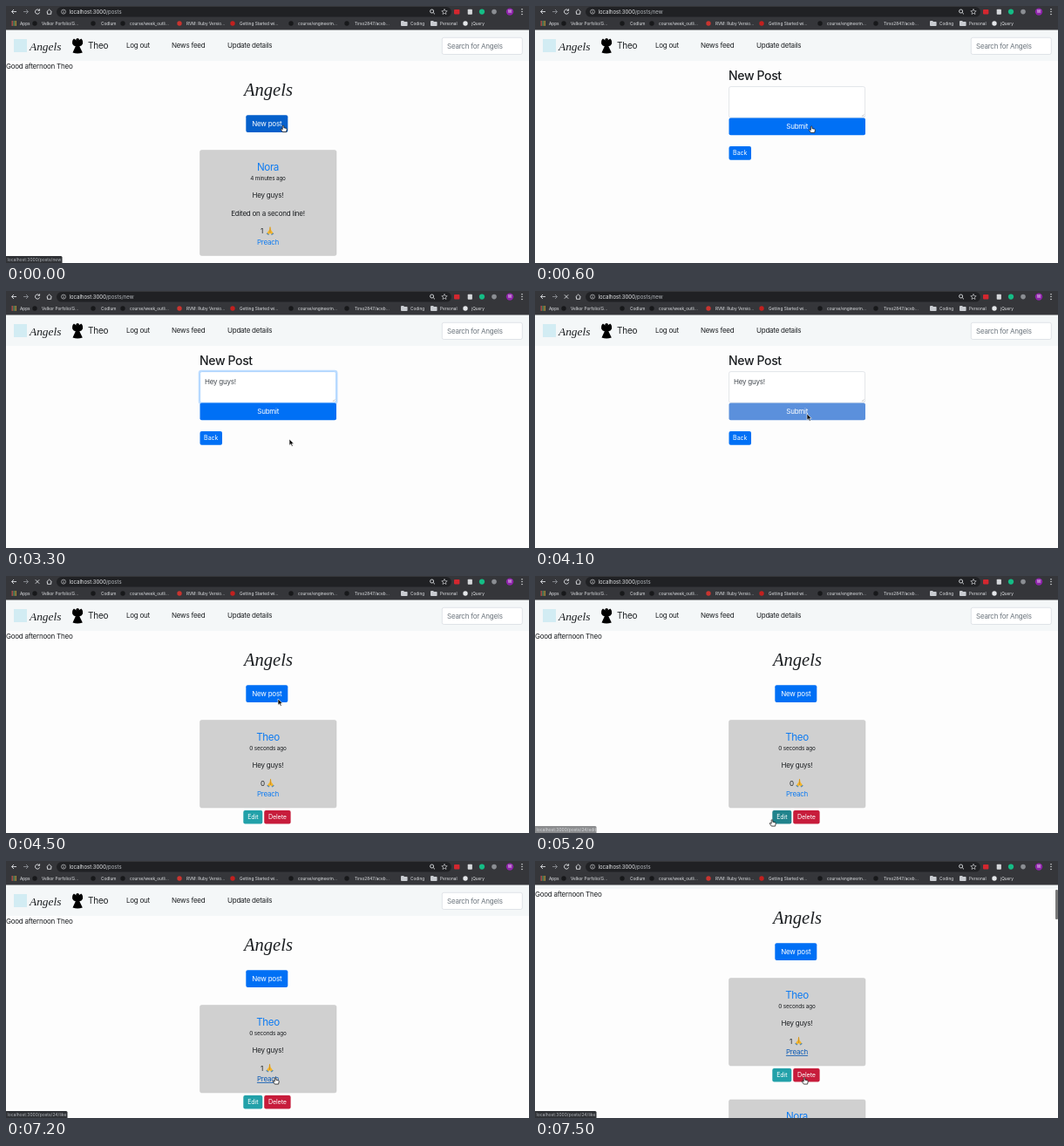
Write an HTML page that moves like this. It is 600x295 px and loops after 7600 ms.

```html
<!DOCTYPE html>
<html lang="en">
<head>
<meta charset="utf-8">
<title>Angels</title>
<style>
  html, body { margin: 0; width: 100%; height: 100%; overflow: hidden; background: #fdfdfd; }
  svg { display: block; }
  text { font: 8px Inter, "Open Sans", sans-serif; letter-spacing: -.23px; fill: #1b1e21; white-space: pre; }
  .mid { text-anchor: middle; }
  .link { fill: #0d7bf2; }
  .name { font-size: 11.6px; letter-spacing: -.4px; }
  .ago { font-size: 6.4px; letter-spacing: -.18px; }
  .small { font-size: 7.1px; letter-spacing: -.08px; }
  .head { font-size: 14px; font-weight: 500; letter-spacing: -.35px; }
  .url { font-size: 6px; letter-spacing: 0; fill: #e8eaed; }
  .fav { font-size: 4.75px; letter-spacing: 0; fill: #e3e5e8; }
  .tip { font-size: 5px; letter-spacing: 0; fill: #b4b8bd; }
  .light { fill: #fff; }
  .script { font-family: "Liberation Serif", serif; font-style: italic; letter-spacing: 0; }
  .path { fill: #b6babf; }
  .stroke { fill: none; stroke: #dfe1e5; stroke-width: .9; }
</style>
</head>
<body>
<svg id="stage" width="600" height="295" viewBox="0 0 600 295">
  <defs>
    <g id="pray">
      <path d="M1.2 7.6 4 3.6 4.6.2Q5-.5 5.4.2L6 3.6 8.8 7.6 6.7 9 5 7.2 3.3 9Z" fill="#f3b52c"/>
      <path d="M5 .4V7" stroke="#bd7c1d" stroke-width=".6"/>
      <path d="M.6 7.9 1.8 7 3.9 8.8 3 9.6ZM9.4 7.9 8.2 7 6.1 8.8 7 9.6Z" fill="#4f88b8"/>
    </g>
    <g id="folder"><path d="M0 1Q0 0 1 0H3L4 1H7Q7.6 1 7.6 2V5Q7.6 6 7 6H1Q0 6 0 5Z" fill="#c9ccd1"/></g>
  </defs>
  <g id="view"></g>
  <g id="chrome"></g>
  <g id="status">
    <rect id="bubble" x="-2" y="287" height="10" rx="1.5" fill="#303236"/>
    <text id="tip" class="tip" x="1.5" y="293"></text>
  </g>
  <rect id="thumb" x="597" y="33" width="3" height="34" rx="1" fill="#777"/>
  <g id="pointer">
    <path id="arrow" d="M0 0V7.2L1.7 5.7 2.9 8.3 4.2 7.7 3 5.2H5.3Z" fill="#111" stroke="#fff" stroke-width=".6"/>
    <path id="hand" d="M-.8.6Q0-.5.8.6V2.8L3.6 3.4Q4.4 3.7 4.2 4.7L3.6 7.6H-.7L-2.8 4.6Q-2.7 3.6-1.7 4.1L-.8 4.8Z" fill="#fff" stroke="#111" stroke-width=".75"/>
  </g>
</svg>
<script>
const LOOP = 7600, STEP = 100;
const USER = 'Theo', FRIEND = 'Nora';
const BLUE = '#0070f5', BLUE_HOVER = '#0560cb';
const MESSAGE = 'Hey guys!';
const $ = id => document.getElementById(id);

const text = (x, y, str, cls = '', extra = '') =>
  `<text x="${x}" y="${y}" class="${cls}" ${extra}>${str}</text>`;
const box = (x, y, w, h, fill, extra = '') =>
  `<rect x="${x}" y="${y}" width="${w}" height="${h}" fill="${fill}" ${extra}/>`;
const dot = (x, y, r, fill) => `<circle cx="${x}" cy="${y}" r="${r}" fill="${fill}"/>`;
const button = (id, x, y, w, h, fill, label, base, cls = '') =>
  box(x, y, w, h, fill, `id="${id}" rx="2"`) + text(x + w / 2, base, label, 'mid light ' + cls);

function card(y, name, ago, lines, count, id) {
  const end = y + 54.5 + 20.5 * lines.length;
  return box(222.5, y, 156.5, end - y + 25.5, '#d0d0d0', 'rx="2" stroke="#c6c6c6" stroke-width=".5"')
    + text(300.5, y + 23, name, 'mid link name')
    + text(300.5, y + 34.8, ago, 'mid ago')
    + lines.map((s, i) => text(300.5, y + 54.5 + 20.5 * i, s, 'mid')).join('')
    + text(292, end, count, '', `id="${id}Count"`)
    + `<use id="${id}Pray" href="#pray" x="298" y="${end - 7.6}"/>`
    + text(300.5, end + 12.5, 'Preach', 'mid link', `id="${id}Preach"`);
}

function navbar() {
  const angel = 'M82 40.5 78 37.5Q75.5 39 76.2 43.5 77.5 46 79.8 46.2L76.5 53.5Q82 55.5 87.8 53.5'
    + 'L84.3 46.2Q86.8 46 88 43.5 88.6 39 86.2 37.5Z';
  return box(0, 27, 600, 36, '#f4f7f8')
    + box(9, 38, 15, 15, '#d2ecf3')
    + text(27, 51, 'Angels', 'script', 'style="font-size:13.4px"')
    + `<path d="${angel}"/>` + dot(82.1, 39, 1.9, '#000')
    + text(94, 48.5, USER, '', 'style="font-size:10px"')
    + text(138, 48, 'Log out') + text(190, 48, 'News feed') + text(254, 48, 'Update details')
    + box(500.3, 36.3, 92, 19.2, '#fff', 'rx="2" stroke="#ced4da" stroke-width=".6"')
    + text(506, 48.8, 'Search for Angels', '', 'style="fill:#6c757d"');
}

function feed() {
  return text(0, 72, 'Good afternoon ' + USER)
    + text(301, 103, 'Angels', 'mid script', 'style="font-size:20.5px"')
    + button('newPost', 275.3, 125.3, 48, 19.6, BLUE, 'New post', 138)
    + `<g id="before">${card(165.5, FRIEND, '4 minutes ago', [MESSAGE, 'Edited on a second line!'], 1, 'old')}</g>`
    + `<g id="after">${card(165.5, USER, '0 seconds ago', [MESSAGE], 0, 'own')}`
    + button('edit', 272.3, 269, 22, 15.6, '#22a1a9', 'Edit', 279.4, 'small')
    + button('remove', 296.2, 269, 30.4, 15.6, '#c71c3b', 'Delete', 279.4, 'small')
    + card(305, FRIEND, '4 minutes ago', [MESSAGE, 'Edited on a second line!'], 1, 'next') + '</g>';
}

function form() {
  return text(222, 84.7, 'New Post', 'head')
    + box(221.6, 91.6, 158, 37.6, 'none', 'id="ring" rx="2.5" stroke="#bcdcff" stroke-width="1.8"')
    + box(222.6, 92.6, 156, 35.6, '#fff', 'id="area" rx="2" stroke-width=".6"')
    + '<path d="M375 126.8 377.4 124.4M376.6 126.8 377.4 126" stroke="#888" stroke-width=".5"/>'
    + text(228, 107, '', '', 'id="typed" style="fill:#454b51"')
    + box(228, 99.5, .7, 9.5, '#222', 'id="caret"')
    + button('submit', 222.5, 128.6, 156.5, 19.6, BLUE, 'Submit', 141.4)
    + button('back', 222.5, 161, 25.5, 15.8, BLUE, 'Back', 171.4, 'small');
}

function chrome() {
  const links = [
    [33, 41, 'Velkor Porfolio/G...', '#17181a'], [100, 109, 'Codlum', '#17181a'],
    [134, 142, 'course/week_outli...', '#17181a'], [199, 207, 'RVM: Ruby Versio...', '#c9342f'],
    [260, 268, 'Getting Started wi...', '#c2201f'], [327, 335, 'course/engineerin...', '#17181a'],
    [391, 400, 'Tirso2847/aceb...', '#17181a'], [527, 534, 'jQuery', '#e4e6e9']
  ];
  let s = box(0, 0, 600, 27.5, '#35363a') + box(58, 1, 453, 11.6, '#202124', 'rx="5.8"');
  s += '<path class="stroke" d="M12 6.5H6.5M9 4 6.5 6.5 9 9"/>'
    + '<path class="stroke" style="stroke:#8b8e93" d="M20 6.5H25.5M23 4 25.5 6.5 23 9"/>'
    + '<path id="reload" class="stroke" d="M38.2 5A2.6 2.6 0 1 0 38.6 7.3M38.6 3.3V5.3H36.6"/>'
    + '<path id="stop" class="stroke" d="M33.8 4.3 38.2 8.7M38.2 4.3 33.8 8.7"/>'
    + '<path class="stroke" d="M46.6 6.8 49.6 4 52.6 6.8M47.5 6.5V9.3H51.7V6.5"/>'
    + '<circle class="stroke" style="stroke-width:.6" cx="66" cy="6.6" r="2.5"/>'
    + '<path class="stroke" style="stroke-width:.7" d="M66 6.3V8M66 4.9V5.5"/>'
    + `<text x="72.5" y="8.8" class="url">localhost:3000<tspan id="path" class="path"></tspan></text>`;
  s += '<circle class="stroke" cx="488.6" cy="6" r="2"/><path class="stroke" d="M490.2 7.6 492 9.4"/>'
    + '<path class="stroke" style="stroke-width:.6" d="M503 3.4 503.9 5.6 506.2 5.8 504.4 7.2 505 9.5 503 8.2 501 9.5 501.6 7.2 499.8 5.8 502.1 5.6Z"/>'
    + box(514, 4, 6.4, 5.4, '#d3272f', 'rx=".8"') + box(529.7, 3.7, 5.2, 6, '#d5d7da', 'rx=".8"')
    + dot(546, 6.6, 3.1, '#15bd86') + dot(560, 6.6, 2.8, '#8b8e93')
    + dot(578, 6.6, 4.2, '#8e24aa') + text(578, 8.4, 'W', 'mid fav light')
    + [3.8, 6.6, 9.4].map(y => dot(592, y, .75, '#e4e6e9')).join('');
  for (let i = 0; i < 9; i++)
    s += box(6.5 + i % 3 * 2, 17.2 + (i / 3 | 0) * 2, 1.4, 1.4, ['#e25b50', '#58a86a', '#dfb13a'][i % 3]);
  s += text(16, 21.8, 'Apps', 'fav')
    + links.map(([cx, x, label, fill]) => dot(cx, 20, 2.7, fill) + text(x, 21.8, label, 'fav')).join('');
  return s + '<use href="#folder" x="453" y="17"/><use href="#folder" x="487" y="17"/>'
    + text(464, 21.8, 'Coding', 'fav') + text(498, 21.8, 'Personal', 'fav');
}

$('view').innerHTML = navbar() + `<g id="feed">${feed()}</g><g id="form">${form()}</g>`;
$('chrome').innerHTML = chrome();

// Pointer stops: time, x, y
const ROUTE = [
  [0, 318, 137], [800, 317, 138], [1100, 303, 112], [2300, 303, 124], [2400, 307, 131],
  [3200, 311, 147], [3300, 325, 170], [3500, 323, 166], [3800, 312, 141], [4800, 312, 141],
  [5000, 288, 225], [5200, 272, 279.5], [5300, 278, 274], [5500, 309, 248.5], [LOOP, 309, 248.5]
];

function pointerAt(t) {
  const i = ROUTE.findIndex(p => p[0] > t);
  const [a, b] = [ROUTE[i - 1], ROUTE[i]];
  const k = (t - a[0]) / (b[0] - a[0]), e = k * k * (3 - 2 * k);
  return [a[1] + (b[1] - a[1]) * e, a[2] + (b[2] - a[2]) * e];
}

const show = (id, on) => { $(id).style.display = on ? '' : 'none'; };
const fill = (id, color) => $(id).setAttribute('fill', color);
const within = (t, a, b) => t >= a && t < b;

function render(t) {
  const writing = within(t, 400, 4500), posted = t >= 4500;
  const loading = within(t, 200, 500) || within(t, 4100, 4700);
  show('form', writing);
  show('feed', !writing);
  show('before', !posted);
  show('after', posted);
  show('stop', loading);
  show('reload', !loading);
  $('path').textContent = writing ? '/posts/new' : '/posts';

  // Form
  const focus = within(t, 1100, 3900);
  show('ring', focus);
  $('area').setAttribute('stroke', focus ? '#80bdff' : '#ced4da');
  const count = Math.max(0, Math.min(MESSAGE.length, Math.floor((t - 1300) / 100)));
  $('typed').textContent = MESSAGE.slice(0, count);
  show('caret', focus && !within(t, 2800, 3400));
  if (writing) $('caret').setAttribute('x', 228.3 + (count ? $('typed').getComputedTextLength() : 0));
  const overSubmit = within(t, 800, 1000) || within(t, 3700, 4100);
  fill('submit', t >= 4100 ? '#5b90dc' : overSubmit ? BLUE_HOVER : BLUE);

  // Feed
  const liking = t >= 5500, overEdit = within(t, 5100, 5400);
  fill('newPost', t < 400 ? BLUE_HOVER : BLUE);
  fill('edit', overEdit ? '#20838c' : '#22a1a9');
  $('ownCount').textContent = t >= 6400 ? 1 : 0;
  $('ownPray').setAttribute('x', t >= 6400 ? 297.5 : 298.5);
  $('ownPreach').style.cssText = liking ? 'fill:#0758b5;text-decoration:underline' : '';
  const scroll = t > 7200 ? 31 * ((t - 7200) / 300) ** 1.5 : 0;
  $('view').setAttribute('transform', `translate(0 ${-scroll})`);
  show('thumb', scroll > 0);

  // Link address
  show('status', t < 400 || t >= 5100);
  $('status').setAttribute('opacity', overEdit ? .55 : 1);
  $('tip').textContent = 'localhost:3000/posts/' + (t < 400 ? 'new' : overEdit ? '24/edit' : '24/like');
  $('bubble').setAttribute('width', t < 400 ? 66.5 : 72.5);

  // Pointer
  const [x, y] = pointerAt(t);
  const hand = t < 1000 || within(t, 3700, 4100) || overEdit || liking;
  show('pointer', !within(t, 1300, 2400));
  show('hand', hand);
  show('arrow', !hand);
  $('pointer').setAttribute('transform', `translate(${x} ${y})`);
}

const start = performance.now();
function tick() {
  const t = (performance.now() - start) % LOOP;
  render(Math.floor(t / STEP) * STEP);
  requestAnimationFrame(tick);
}
tick();
</script>
</body>
</html>
```
